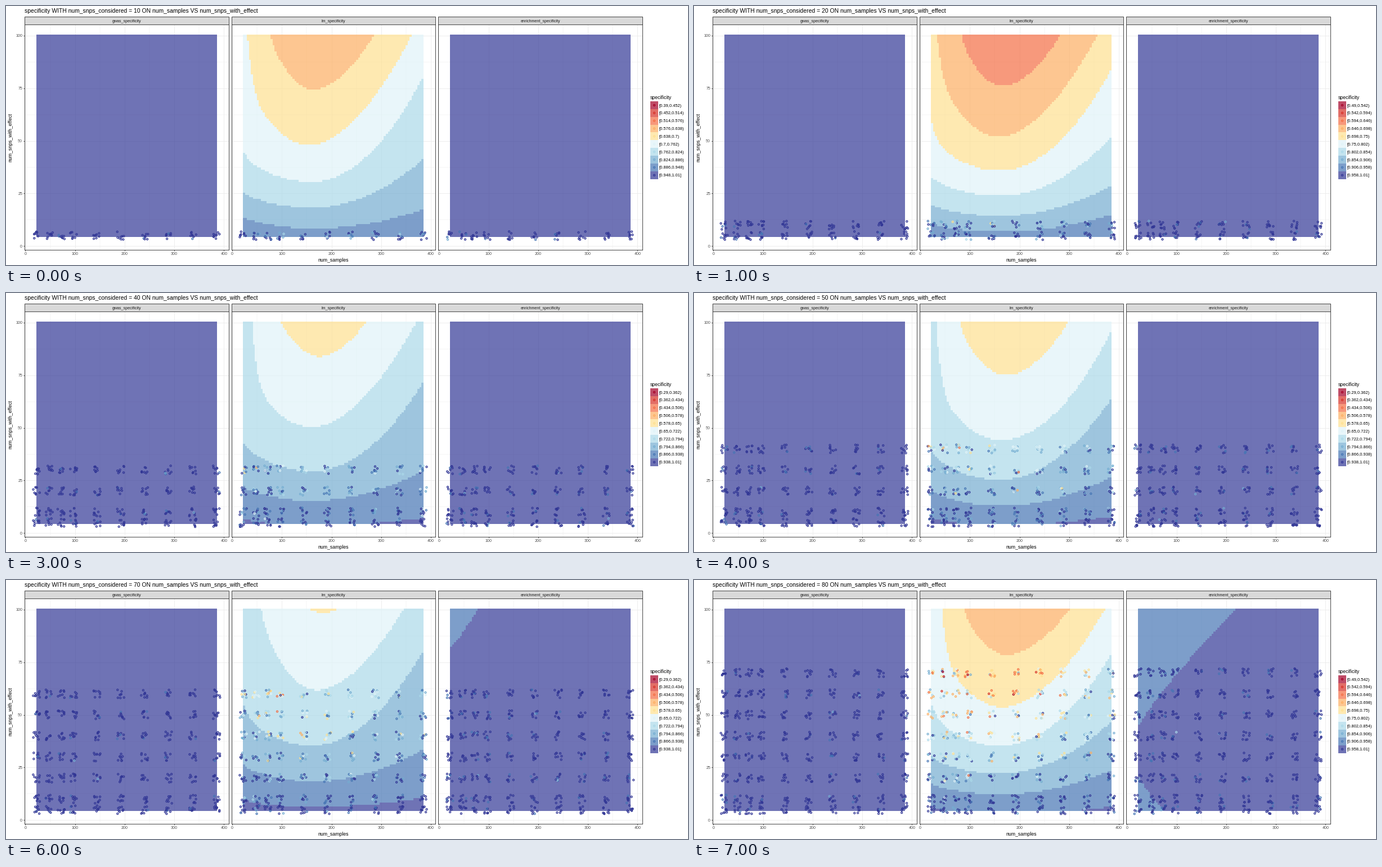
A matplotlib script that plays this animation: 1212 by 462 pixels, repeating every 8000 ms.

```python
import numpy as np
import matplotlib.pyplot as plt
from matplotlib.animation import FuncAnimation
from matplotlib.colors import to_rgb
from matplotlib.patches import Rectangle

W, H, DPI = 1212, 462, 96
PT = 72 / DPI  # points per pixel
plt.rcParams["font.family"] = "Liberation Sans"

PALETTE = np.array([to_rgb("#" + c) for c in (
    "a50026 d73027 f46d43 fdae61 fee090 "
    "e0f3f8 abd9e9 74add1 4575b4 313695").split()])
TILE_ALPHA = 0.7
INK, GRID = "#333333", "#ebebeb"

XMIN, XMAX, TOP = 22, 386, 100.6
COLS, ROWS = np.meshgrid(np.arange(24, 385, 4), np.arange(5, 101))
GROUPS = np.array([22, 48, 72, 97, 144, 192, 240, 288, 337, 385])
PER_GROUP = 8

PANELS = ["gwas_specificity", "lm_specificity", "enrichment_specificity"]
PANEL_X, PANEL_Y = [33.4, 401, 768.4], 32.8
PANEL_W, PANEL_H = 362.3, 402
STRIP_H = 14
X_UNIT, Y_UNIT = 0.8825, 3.757


def curve(xl, yl, xm, ym, xr, yr, a=0.85):
    """Contour height: steep left arm, low point, power-law right arm."""
    p = 1.8 if yr >= TOP else 2.0

    def height(x):
        t = np.where(x < xm, (xm - x) / (xm - xl), (x - xm) / (xr - xm))
        left = ym + (yl - ym) * (a * t**2 + (1 - a) * t**12)
        right = ym + (yr - ym) * t**p
        return np.where(t > 1, np.inf, np.where(x < xm, left, right))
    return height


def bowl(yl, ym, yr, a=0.85):
    return curve(XMIN, yl, 160, ym, XMAX, yr, a)


def wall(xl, xm, ym, xr, a=0.85):
    return curve(xl, TOP, xm, ym, xr, TOP, a)


# considered snps: lowest limit, class under the first contour, contours upward
SURFACES = {
    10: (0.39, 8, [bowl(13.6, 8.5, 17.6, 1), bowl(25.8, 18.4, 41.5),
                   bowl(45.5, 30.6, 80.7, 0.75), wall(31, 157, 48.2, 363, 0.5),
                   wall(78, 165, 74.5, 287)]),
    20: (0.49, 8, [bowl(11, 7, 15), bowl(20, 14.5, 29), bowl(33, 24, 52),
                   bowl(60, 36, 84, 0.6), wall(34, 160, 52, 358, 0.6),
                   wall(84, 167, 76, 284)]),
    30: (0.39, 8, [bowl(18.2, 10.5, 24.5), bowl(29.5, 21.5, 48),
                   bowl(55.5, 35, 87, 0.65), wall(44, 164, 55.6, 348, 0.62),
                   wall(101, 173, 85.7, 267, 0.9)]),
    40: (0.29, 9, [bowl(7, 3.7, 7.2), bowl(22.4, 15.6, 29.8),
                   bowl(42.9, 29.5, 72), wall(40, 162, 50.4, 372, 0.42),
                   wall(98, 178, 83.9, 271, 0.95)]),
    50: (0.29, 9, [bowl(7, 4, 8), bowl(21, 13, 27), bowl(39, 25.5, 64),
                   curve(32, TOP, 162, 44.5, XMAX, 96, 0.42),
                   wall(80, 176, 75, 300)]),
    60: (0.39, 9, [bowl(6.5, 3.6, 6.9), bowl(21.6, 13.6, 26.9),
                   bowl(37.8, 25.8, 58.6),
                   curve(25, TOP, 157, 42.3, XMAX, 94, 0.4),
                   wall(70, 171, 67.6, 322, 0.75), wall(169, 183, 99.2, 197)]),
    70: (0.29, 9, [bowl(9.8, 6.4, 10.8), bowl(26.4, 18.6, 33.8),
                   bowl(56.5, 35.5, 80.7, 0.65), wall(59, 171, 61.9, 346, 0.82),
                   wall(154, 185, 98.7, 216)]),
    80: (0.49, 9, [bowl(6.4, 3.2, 6.5), bowl(17.6, 12.4, 23.9),
                   bowl(30.4, 22.3, 47), bowl(56.5, 35.4, 78.8, 0.65),
                   wall(44, 167, 53.8, 374, 0.5), wall(89, 176, 78.6, 303)]),
}

# lighter corner of the enrichment panel: left height, right end, bend
CORNERS = {30: (93, 38, 1), 60: (74.5, 98, 1.3),
           70: (82, 79, 1.2), 80: (44, 219, 0.87)}


def lm_class(n, x, y):
    _, start, contours = SURFACES[n]
    x = np.clip(x, 24, 384)
    return start - sum((y > c(x)).astype(int) for c in contours)


def enrichment_class(n, x, y):
    out = np.full(np.shape(x), 9)
    dx = np.clip(x, XMIN, XMAX) - XMIN
    if n in CORNERS:
        y0, x1, bend = CORNERS[n]
        out[y > y0 + (TOP - y0) * (dx / (x1 - XMIN)) ** bend] = 8
    if n == 80:
        out[y < 22.5 - 18 * (dx / 56) ** 0.7] = 8
    return out


def gwas_class(n, x, y):
    return np.full(np.shape(x), 9)


CLASSIFIERS = [gwas_class, lm_class, enrichment_class]


def samples(n, panel):
    """Jittered points and their classes for one panel."""
    rng = np.random.default_rng(100 * n + panel)
    rows = [5] + list(range(10, n, 10))
    gx, gy = np.meshgrid(np.repeat(GROUPS, PER_GROUP), rows)
    x = gx.ravel() + rng.uniform(-7, 7, gx.size)
    y = gy.ravel() + rng.uniform(-2, 2, gx.size)
    if panel == 1:
        noise = rng.normal(1.2 - y / 45, 1.7)
        cls = lm_class(n, x, y) + np.rint(noise)
    else:
        cls = 9 - np.floor(rng.exponential([0.36, 0, 0.48][panel], x.size))
    return np.column_stack([x, y]), np.clip(cls, 0, 9).astype(int)


def limits(low):
    edges = np.round(np.linspace(low, 1.01, 11), 3)
    return [f"[{a:g},{b:g}" + ("]" if i == 9 else ")")
            for i, (a, b) in enumerate(zip(edges, edges[1:]))]


fig = plt.figure(figsize=(W / DPI, H / DPI), dpi=DPI, facecolor="white")
stage = fig.add_axes([0, 0, 1, 1])
stage.set(xlim=(0, W), ylim=(H, 0))
stage.axis("off")


def label(x, y, text, size, color="black", **kw):
    return stage.text(x, y, text, fontsize=size * PT, color=color, **kw)


def ring(ax, x, y, colors):
    return ax.scatter(x, y, s=(3 * PT) ** 2, facecolors="none",
                      edgecolors=colors, linewidths=1.25 * PT, zorder=3)


def make_panel(i):
    x0 = PANEL_X[i]
    stage.add_patch(Rectangle((x0, PANEL_Y - STRIP_H), PANEL_W, STRIP_H,
                              fc="#d9d9d9", ec=INK, lw=0.9 * PT))
    label(x0 + PANEL_W / 2, 29, PANELS[i], 7.1, "#1a1a1a", ha="center")
    ax = fig.add_axes([x0 / W, 1 - (PANEL_Y + PANEL_H) / H,
                       PANEL_W / W, PANEL_H / H])
    img = ax.imshow(np.ones((*COLS.shape, 4)), origin="lower", aspect="auto",
                    extent=(XMIN, XMAX - 0.8, 4.5, 100.5),
                    interpolation="nearest", zorder=1)
    dots = ring(ax, [], [], "none")
    ax.set_xticks(range(0, 401, 100))
    ax.set_xticks(range(50, 400, 100), minor=True)
    ax.set_yticks(range(0, 101, 25))
    ax.set_yticks(np.arange(12.5, 100, 25), minor=True)
    left, bottom = -1.2, -1.7
    ax.set_xlim(left, left + PANEL_W / X_UNIT)
    ax.set_ylim(bottom, bottom + PANEL_H / Y_UNIT)
    ax.set_axisbelow(True)
    ax.grid(True, which="major", color=GRID, lw=0.9 * PT)
    ax.grid(True, which="minor", color=GRID, lw=0.45 * PT)
    ax.tick_params(length=2.2 * PT, width=0.9 * PT, pad=2 * PT, color=INK,
                   labelcolor="#4d4d4d", labelsize=7.1 * PT)
    ax.tick_params(which="minor", length=0)
    if i:
        ax.tick_params(axis="y", left=False, labelleft=False)
    for spine in ax.spines.values():
        spine.set(color=INK, linewidth=0.9 * PT)
    return img, dots


panels = [make_panel(i) for i in range(3)]
title = label(33, 12, "", 10.4)
label(582, 455.5, "num_samples", 8.75, ha="center")
label(8, 234.5, "num_snps_with_effect", 8.75, rotation=90,
      ha="center", va="center")

# legend
KEY_TOP, KEY = 170, 13.87
label(1144.5, 166.5, "specificity", 8.75)
keys = []
for k, color in enumerate(PALETTE):
    y = KEY_TOP + k * KEY
    stage.add_patch(Rectangle((1145, y), KEY, KEY, fc=color, lw=0,
                              alpha=TILE_ALPHA))
    ring(stage, [1152], [y + KEY / 2], [color])
    keys.append(label(1160.5, y + KEY / 2 + 2.6, "", 7.5))

STEPS = sorted(SURFACES)


def update(i):
    n = STEPS[i]
    title.set_text(f"specificity WITH num_snps_considered = {n} "
                   "ON num_samples VS num_snps_with_effect")
    for key, text in zip(keys, limits(SURFACES[n][0])):
        key.set_text(text)
    for p, (img, dots) in enumerate(panels):
        rgb = PALETTE[CLASSIFIERS[p](n, COLS, ROWS)]
        img.set_data(np.dstack([rgb, np.full(COLS.shape, TILE_ALPHA)]))
        pos, cls = samples(n, p)
        dots.set_offsets(pos)
        dots.set_edgecolors(PALETTE[cls])


anim = FuncAnimation(fig, update, frames=len(STEPS), interval=1000,
                     init_func=lambda: None, repeat=True, repeat_delay=0)
plt.show()
```
